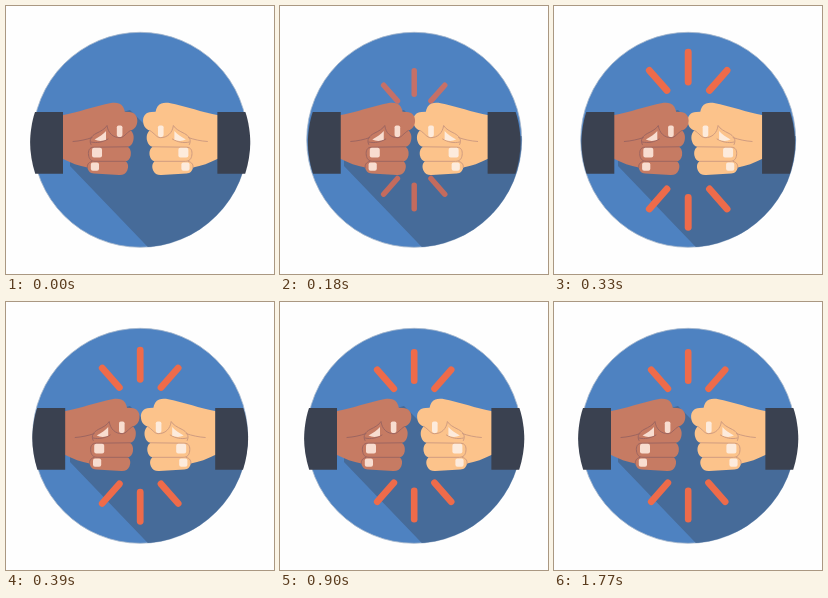
An HTML page that plays this animation: 268x268 px, repeating every 1.8 s.

```html
<!DOCTYPE html>
<html lang="en">
<head>
<meta charset="utf-8">
<title>Fist bump</title>
<style>
  html, body { margin: 0; width: 100%; height: 100%; overflow: hidden; background: #fefefe; }
  svg { display: block; width: 100vw; height: 100vh; }
  .line { fill: none; stroke-width: 1; stroke-linecap: round; stroke-linejoin: round; }
</style>
</head>
<body>
<svg viewBox="0 0 268 268">
  <defs>
    <clipPath id="disc"><circle cx="134.2" cy="133.8" r="107.5"/></clipPath>
  </defs>
  <circle cx="134.2" cy="133.8" r="107.5" fill="#4e82c1" stroke="#a9b9cd" stroke-width="0.8"/>
  <path d="M64 160V120L124 104L150 130H260V261H161Z" fill="#466b99" clip-path="url(#disc)"/>
  <g id="rays" stroke="#ee6b4a" stroke-width="6.6" stroke-linecap="round"></g>
  <g id="right"></g>
  <g id="left"></g>
</svg>
<script>
const LOOP = 1800, HIT = 240, REST = 510, CX = 134.2, CY = 133.7;
const byId = id => document.getElementById(id);
const rays = byId('rays'), left = byId('left'), right = byId('right');

// A left-side fist; the right one is its mirror image.
const fist = (skin, line, nail) => `
  <path fill="${skin}" d="M56 109.2C64 107.6 73 105.4 80 103.2L99 98.2
    C104 97 109 96 113 97.4C116.5 98.8 118.2 102 118.8 105.8L123 106
    C128.5 106.2 131.5 110 131.3 115C131.1 120 128.5 123.5 124.5 124.5
    C127.5 126.5 128.3 131 127.2 135C126.3 138.5 124.5 140.2 121.5 140.8
    C124.5 142.4 125.3 146 124.7 149.5C124 153 122.3 154.8 119.5 155.3
    C122.3 157 122.7 161 121.2 164.5C119.7 168 117 169.2 113 169
    L88 167.6C84 167.2 82 165 81.4 161.5C73 160 65 157 56 152.5Z"/>
  <g class="line" stroke="${line}">
    <path d="M67 135.5C74 135 80 133.6 86 131.6"/>
    <path d="M85 138.5C82.5 133.5 85.5 130 90 127.5C95 125 99 123 101 119.5C102 127 107 131.7 114 131.7C118 131.5 119.5 127.5 124.5 124.5"/>
    <path d="M85 136C91 137.5 97 136 102 133"/>
    <path d="M121.5 140.8L88 141.2C83 141.2 82 145 82.5 149C83 153 85 155.3 89 155.3H119.5"/>
    <path d="M86 155.3C82 156.5 81 159 81.4 161.5"/>
  </g>
  <g fill="${nail}">
    <rect x="110.8" y="119.4" width="5.6" height="11.5" rx="1.8"/>
    <path d="M88.5 133.5C93 131 97.5 128 100 125V133.8C96 135.4 92 135.2 88.5 133.5Z"/>
    <rect x="86" y="141.8" width="10" height="9.7" rx="2"/>
    <rect x="84.8" y="156.6" width="8.2" height="8.2" rx="2"/>
  </g>
  <path fill="#3a4150" d="M29 106H57V167.7H29.2C25.8 157 24.1 146 24.1 137S25.6 116 29 106Z"/>`;

left.innerHTML = fist('#c67b63', '#9d6560', '#f8ddd0');
right.innerHTML = fist('#fcc38b', '#d09c80', '#fdebdc');

const ray = (x1, y1, x2, y2) => `<path d="M${x1} ${y1}L${x2} ${y2}"/>`;
rays.innerHTML = [-1, 1].map(s =>
  ray(0, s * 55, 0, s * 83.5) +
  [-1, 1].map(q => ray(q * 20.3, s * 47, q * 37, s * 66)).join('')
).join('');

function pose(t) {
  const up = Math.min(t / HIT, 1);
  const back = Math.min(Math.max((t - HIT) / (REST - HIT), 0), 1);
  const shift = 5 * (up - back);
  const size = up < 1 ? 1.095 * up : 1 + 0.095 * Math.pow(1 - back, 1.6);
  left.setAttribute('transform', `translate(${shift} 0)`);
  right.setAttribute('transform', `translate(${2 * CX - shift} 0) scale(-1 1)`);
  rays.setAttribute('transform', `translate(${CX} ${CY}) scale(${size})`);
  rays.setAttribute('opacity', up);
}

const start = performance.now();
function tick() {
  pose((performance.now() - start) % LOOP);
  requestAnimationFrame(tick);
}
tick();
</script>
</body>
</html>
```
